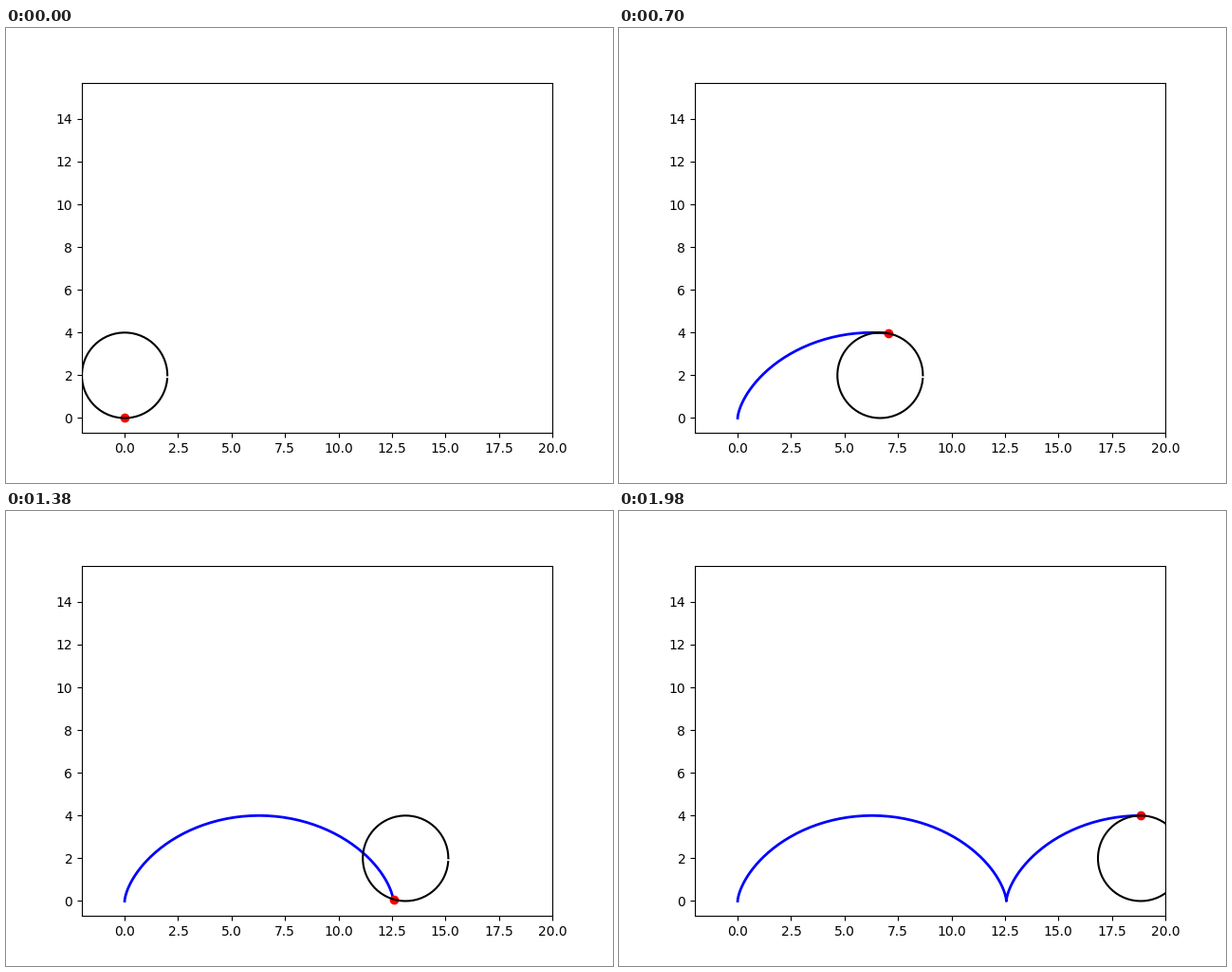
A matplotlib script that plays this animation: 640 px wide and 480 px high, repeating every 2000 ms.

```python
import numpy as np
import matplotlib.pyplot as plt
from matplotlib.animation import FuncAnimation

R = 2
FRAMES = 100

theta = np.linspace(0, 3 * np.pi, FRAMES)
x = R * (theta - np.sin(theta))
y = R * (1 - np.cos(theta))

# The rim stops just short of a full turn, leaving a small gap.
phi = np.arange(0, 2 * np.pi, 0.1)
rim_x, rim_y = R * np.cos(phi), R + R * np.sin(phi)

fig, ax = plt.subplots(figsize=(6.4, 4.8), dpi=100)
fig.subplots_adjust(left=0.125, right=0.9, bottom=0.11, top=0.88)

# Equal scale on both axes, centred on y = 7.5.
half = 0.5 * 22 * (0.77 * 4.8) / (0.775 * 6.4)
ax.set_xlim(-2, 20)
ax.set_ylim(7.5 - half, 7.5 + half)

trail, = ax.plot([], [], "b-", lw=2)
dot, = ax.plot([], [], "ro", ms=6)
wheel, = ax.plot([], [], "k-", lw=1.5)


def update(i):
    trail.set_data(x[:i + 1], y[:i + 1])
    dot.set_data([x[i]], [y[i]])
    wheel.set_data(rim_x + R * theta[i], rim_y)
    return trail, dot, wheel


anim = FuncAnimation(fig, update, frames=FRAMES, interval=20,
                     repeat=True, repeat_delay=0, blit=False)
plt.show()
```
